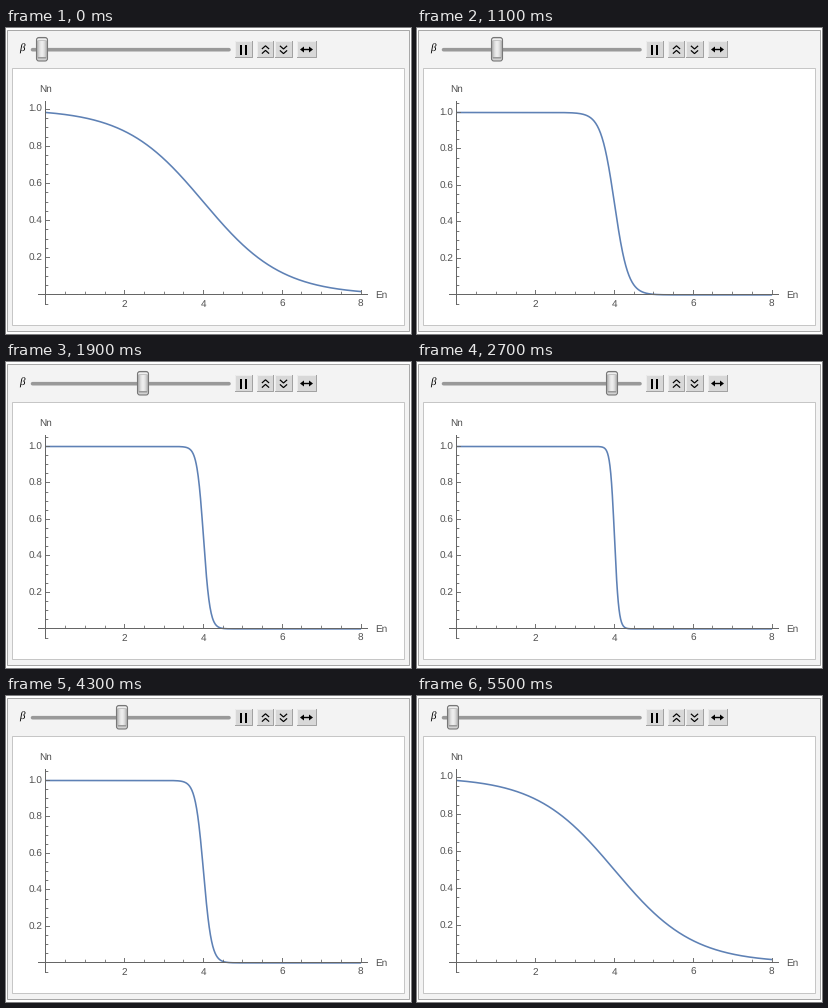
These frames come from a looping animation (405x306 px, 6000 ms). A matplotlib script:

```python
import numpy as np
import matplotlib.pyplot as plt
from matplotlib.animation import FuncAnimation
from matplotlib.collections import LineCollection
from matplotlib.patches import FancyBboxPatch, Polygon, Rectangle
from matplotlib.transforms import Affine2D

W, H = 405, 306
X0, Y0 = 39.9, 266.9          # plot origin in pixels
X_UNIT = 39.4                 # pixels per unit of En
PLOT_H = 182.4                # pixel height of the curve's maximum
Y_TOP, Y_BOTTOM = 73, 277
AXIS, CURVE, TEXT = "#666666", "#5e81b5", "#505050"
STEPS = 25

plt.rcParams["font.family"] = "Liberation Sans"
plt.rcParams["text.hinting"] = "none"

# At 72 dpi one point equals one pixel.
fig = plt.figure(figsize=(W / 72, H / 72), dpi=72, facecolor="white")
ax = fig.add_axes([0, 0, 1, 1])
ax.set_xlim(0, W)
ax.set_ylim(H, 0)
ax.axis("off")


def center(v):
    """Centre of the pixel that holds coordinate v."""
    return np.floor(v) + 0.5


def box(x, y, w, h, fill, edge="none", z=1):
    ax.add_patch(Rectangle((x, y), w, h, fc=fill, ec=edge, lw=1, zorder=z,
                           snap=False, joinstyle="miter"))


def stroke(xs, ys, color="black", lw=1.0, z=4, **kw):
    kw.setdefault("solid_capstyle", "butt")
    return ax.plot(xs, ys, color=color, lw=lw, zorder=z, snap=False, **kw)[0]


def label(x, y, s, ha="center", size=10, **kw):
    return ax.text(x, y + 3.6, s, ha=ha, va="baseline", fontsize=size,
                   color=kw.pop("color", TEXT), zorder=6, **kw)


def button(x, w):
    box(x, 13, w, 17, "#d8d8d8", z=2)
    stroke([x + 0.5, x + 0.5, x + w], [30, 13.5, 13.5], "#ececec", z=3)
    stroke([x, x + w - 0.5, x + w - 0.5], [29.5, 29.5, 13],
           "#a2a2a2", z=3)


def chevrons(x, direction):
    for y in (19.4, 24.0):
        stroke([x - 3.6, x, x + 3.6],
               [y + 1.6 * direction, y - 1.6 * direction, y + 1.6 * direction],
               lw=1.2, solid_joinstyle="miter")


def draw_panel():
    box(1.5, 2.5, 402, 301, "#f3f3f3", "#a8a8a8")
    box(6.5, 40.5, 392, 257, "white", "#c6c6c6")
    label(15.8, 20, "β", size=11, family="Liberation Serif",
          style="italic", color="black")
    stroke([26.5, 223], [21.7, 21.7], "#999999", 3.6, 2,
           solid_capstyle="round")
    for x, w in ((229, 18), (251, 17), (269, 18), (291, 20)):
        button(x, w)
    for x in (234, 239):
        box(x, 17, 2, 10, "black", z=4)
    chevrons(259.5, 1)
    chevrons(277.5, -1)
    stroke([296, 305], [21.5, 21.5], lw=1.4)
    for tip, back in ((294, 298), (307, 303)):
        ax.add_patch(Polygon([(tip, 21.5), (back, 18.5), (back, 24.5)],
                             fc="black", ec="none", zorder=4))


def draw_thumb():
    """Slider knob centred on x = 0, placed through the returned transform."""
    move = Affine2D()
    trans = move + ax.transData
    ax.add_patch(FancyBboxPatch((-5.5, 9.5), 11, 23.5,
                                boxstyle="round,pad=0,rounding_size=2.5",
                                fc="#d2d2d2", ec="#777777", lw=1.1, zorder=7,
                                transform=trans, snap=False))
    shade = 0.62 + 0.31 * np.sin(np.linspace(0.05, 0.95, 24) * np.pi)
    ax.imshow(shade[None, :], cmap="gray", vmin=0, vmax=1,
              extent=(-5, 5, 29, 13), transform=trans,
              aspect="auto", zorder=8)
    for y, color in ((11.5, "#efefef"), (12.5, "#c4c4c4"),
                     (29.5, "#9a9a9a"), (30.5, "#b4b4b4")):
        stroke([-4.5, 4.5], [y, y], color, 1.0, 9, transform=trans)
    ax.set_xlim(0, W)
    ax.set_ylim(H, 0)
    return move


def draw_axes():
    base, left = center(Y0), center(X0)
    stroke([32, 362], [base, base], AXIS, z=5)
    stroke([left, left], [Y_TOP, Y_BOTTOM], AXIS, z=5)
    for n in range(1, 17):
        x = center(X0 + n * X_UNIT / 2)
        major = n % 4 == 0
        stroke([x, x], [base, base - (4.5 if major else 2.8)], AXIS,
               0.9 if major else 0.8, 5)
        if major:
            label(X0 + n * X_UNIT / 2 - 0.4, 275.3, str(n // 2))
    label(39.2, 60.7, "Nn")
    label(375.5, 266.3, "En")


draw_panel()
draw_axes()
thumb = draw_thumb()
curve = stroke([], [], CURVE, 1.6, 4)
y_ticks = LineCollection([], colors=AXIS, linewidths=0.9, zorder=5,
                         snap=False)
ax.add_collection(y_ticks)
y_labels = [(v, label(36.4, 0, f"{v:.1f}", "right"))
            for v in (0.2, 0.4, 0.6, 0.8, 1.0)]
energy = np.linspace(0, 8, 800)


def draw(i):
    # Hold, sweep up, hold, sweep down.
    step = max(0, min(i - 4, 55 - i))
    slider = max(36, 29.4 + 7.2 * step)
    beta = 1 + 19 * (slider - 36) / (29.4 + 7.2 * STEPS - 36)
    filling = 1 / (np.exp(beta * (energy - 4)) + 1)
    scale = PLOT_H / filling[0]

    thumb.clear().translate(round(slider), 0)
    curve.set_data(X0 + energy * X_UNIT, Y0 - filling * scale)
    ticks = []
    for n in range(-1, 22):
        y = center(Y0 - 0.05 * n * scale)
        if n and Y_TOP <= y <= Y_BOTTOM:
            length = 4.5 if n % 4 == 0 else 2.8
            ticks.append([(center(X0), y), (center(X0) + length, y)])
    y_ticks.set_segments(ticks)
    for value, text in y_labels:
        text.set_y(Y0 - value * scale + 3.2)
    return []


anim = FuncAnimation(fig, draw, frames=60, interval=100, repeat=True,
                     repeat_delay=0, blit=False)
plt.show()
```
